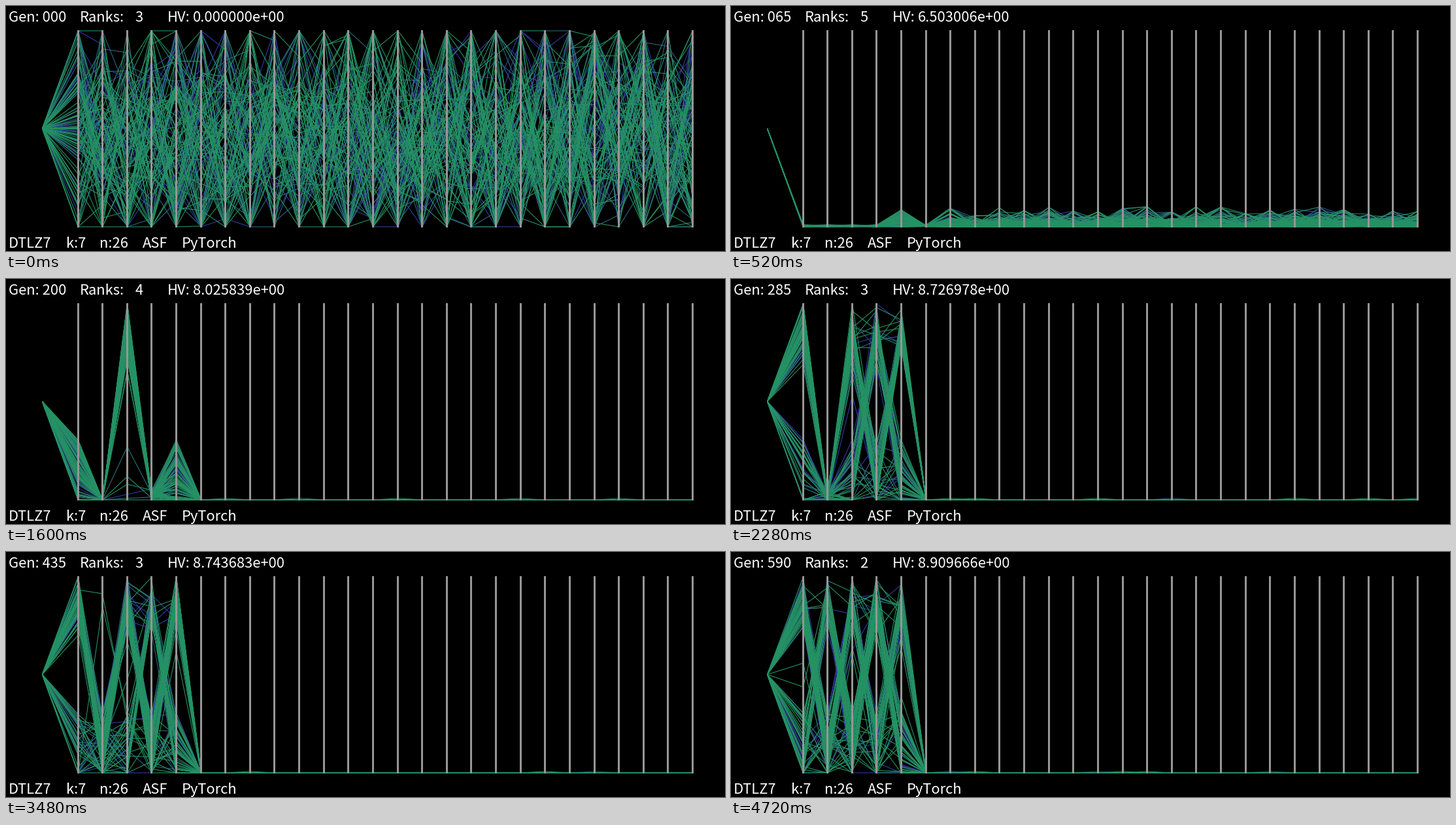
A matplotlib script that plays this animation: 1100x375 px, repeating every 4760 ms.

```python
import numpy as np
import matplotlib.pyplot as plt
from matplotlib.animation import FuncAnimation
from matplotlib.collections import LineCollection

W, H, DPI = 1100, 375, 100
FRAMES, INTERVAL, GENS_PER_FRAME = 119, 40, 5
POPULATION, VARIABLES = 105, 26
TOP, BOTTOM = 38, 338
GREEN = np.array([36, 146, 99]) / 255
BLUE = np.array([50, 58, 162]) / 255
GREY = "#969696"

# Readouts at a few generations.
GENS = [0, 65, 200, 285, 435, 525, 590]
HYPERVOLUME = [0, 6.503006, 8.025839, 8.726978, 8.743683, 8.963828, 8.909666]
RANKS = [3, 5, 4, 3, 3, 2, 2]

# Generation at which each position variable spreads out, then splits in two.
SPREAD_START = np.array([70, 270, 80, 180, 35])
SPLIT_START = np.array([200, 430, 100, 202, 202])
POSITIONAL = len(SPREAD_START)

bars = np.floor(110 + 37.62 * np.arange(VARIABLES))
xs = np.concatenate([[55], bars]) + .5
axis_reach = np.random.default_rng(4).uniform(.65, 1.15, VARIABLES)


def ramp(gen, start, length):
    return np.clip((gen - start) / length, 0, 1)


def at_gen(values, gen):
    return np.interp(gen, GENS, values)


def wobble(gen):
    return np.sin(5 * np.pi * at_gen(range(len(GENS)), gen))


def individual(i, frame):
    """Decision vector and rank quantile; members are renewed now and then."""
    gen = frame * GENS_PER_FRAME
    rng = np.random.default_rng([i, (frame + 5 * i) // (6 + i % 9)])
    start = np.clip(rng.normal(.45, .3, VARIABLES), 0, 1)
    choice, depth = rng.random((2, POSITIONAL))
    peak = np.clip(.86 + .06 * rng.standard_t(4, POSITIONAL), .35, 1)
    mutated = rng.random(VARIABLES) < .003
    rank_quantile = rng.random()

    settle = ramp(gen, 0, 65)
    x = start ** (1 + 1.6 * settle) * axis_reach ** settle * np.exp(-gen / 27)
    x += mutated * .007 * (gen > 100)

    # The first variable to split takes nearly everyone until others follow.
    fade = np.exp(-gen / 14)
    split = ramp(gen, SPLIT_START, 80)
    share = split * (.46 + .28 * (1 - split[-1]))
    low = ramp(gen, SPREAD_START, 110) * .31 * np.maximum(0, 1.25 * depth - .25)
    was_high = False
    for j in range(POSITIONAL):
        was_high = choice[j] < share[j] * (.4 if was_high else 1.3)
        x[j] = start[j] * fade + (1 - fade) * (peak[j] if was_high else low[j])
    x[POSITIONAL] = start[POSITIONAL] * fade
    return np.clip(x, 0, 1), rank_quantile


fig = plt.figure(figsize=(W / DPI, H / DPI), dpi=DPI, facecolor="black")
ax = fig.add_axes([0, 0, 1, 1])
px = 72 / DPI
lines = LineCollection([], linewidths=1.1 * px)
ax.add_collection(lines, autolim=False)
ax.bar(bars - 1, BOTTOM - TOP + 2, width=3, bottom=TOP - 1, align="edge",
       color=GREY, linewidth=0, zorder=3)
ax.set_xlim(0, W)
ax.set_ylim(H, 0)
ax.axis("off")


def label(x, y, text="", **kwargs):
    return ax.text(x, y, text, color="white", family="Noto Sans CJK JP",
                   size=21.9 * px, va="baseline", zorder=4, **kwargs)


gen_text = label(4.2, 24)
label(113.2, 24, "Ranks:")
rank_text = label(209.6, 24, ha="right")
label(247.2, 24, "HV:")
hv_text = label(286.2, 24)
for x, text in [(4.2, "DTLZ7"), (92.2, "k:7"), (143.2, "n:26"), (209.2, "ASF"), (269.2, "PyTorch")]:
    label(x, 370, text)


def update(frame):
    gen = frame * GENS_PER_FRAME
    ranks = max(2, round(at_gen(RANKS, gen) + .7 * wobble(gen)))
    hv = at_gen(HYPERVOLUME, gen) + .03 * wobble(gen)
    gen_text.set_text(f"Gen: {gen:03d}")
    rank_text.set_text(str(ranks))
    hv_text.set_text(f"{hv:.6e}")

    members = []
    for i in range(POPULATION):
        x, quantile = individual(i, frame)
        ys = np.concatenate([[187.5], BOTTOM - x * (BOTTOM - TOP)])
        members.append((int(ranks * quantile ** 2.1), np.column_stack([xs, ys])))
    members.sort(key=lambda member: -member[0])
    lines.set_segments([path for _, path in members])
    lines.set_color([GREEN + (BLUE - GREEN) * rank / (ranks - 1) for rank, _ in members])
    return lines, gen_text, rank_text, hv_text


anim = FuncAnimation(fig, update, frames=FRAMES, interval=INTERVAL,
                     repeat=True, repeat_delay=0, blit=False)
plt.show()
```
